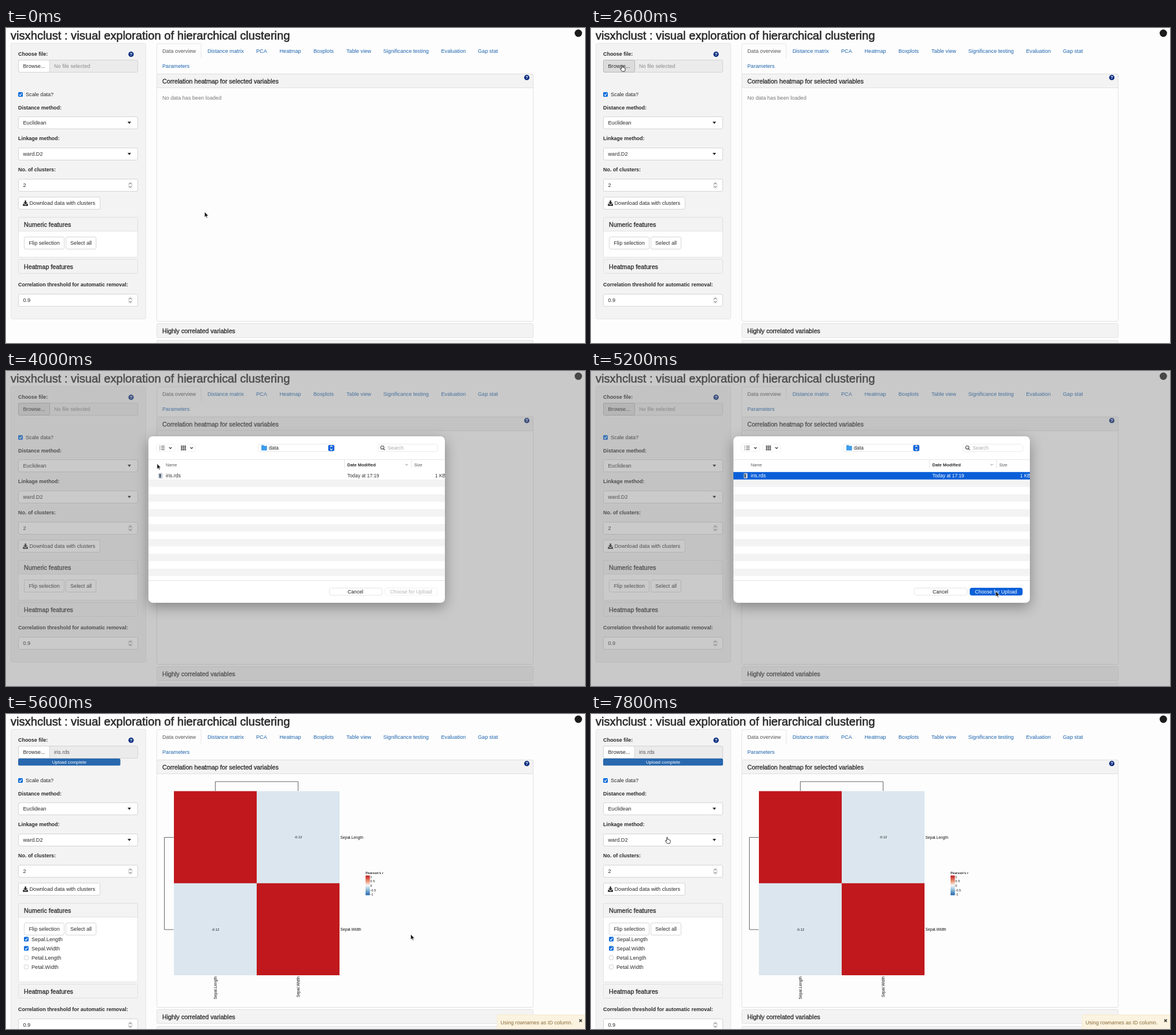
An HTML page that plays this animation: 1000x545 px, repeating every 8 s.

```html
<!DOCTYPE html>
<html lang="en">
<head>
<meta charset="utf-8">
<title>Hierarchical clustering app</title>
<style>
  html, body { margin: 0; width: 100%; height: 100%; overflow: hidden; background: #fdfdfd; }
  svg { display: block; width: 100%; height: 100%; font-family: "Liberation Sans", Arial, sans-serif; }
  text { white-space: pre; }
  #dialog { filter: drop-shadow(0 7px 11px rgba(0, 0, 0, .34)); }
</style>
</head>
<body>
<svg id="stage" viewBox="0 0 1000 545"></svg>
<script>
const LOOP = 8000, STEP = 200;
const INK = '#2b2b2b', LINK = '#1d64ae', BLUE = '#0a5fd8', RED = '#c0181c', PALE = '#dbe6ee';

// ---- drawing helpers ----
const attrs = o => Object.entries(o).map(([k, v]) => `${k}="${v}"`).join(' ');
const rect = (x, y, w, h, fill, o = {}) =>
  `<rect x="${x}" y="${y}" width="${w}" height="${h}" fill="${fill}" ${attrs(o)}/>`;
const box = (x, y, w, h, fill = '#fff', stroke = '#ccc', rx = 2.5, o = {}) =>
  rect(x + .5, y + .5, w - 1, h - 1, fill, { stroke, rx, 'stroke-width': .8, ...o });
const line = (d, stroke = '#ddd', width = .8, o = {}) =>
  `<path d="${d}" fill="none" stroke="${stroke}" stroke-width="${width}" ${attrs(o)}/>`;
const shape = (d, fill) => `<path d="${d}" fill="${fill}"/>`;
const group = (id, body, o = {}) => `<g id="${id}" ${attrs(o)}>${body}</g>`;

// y is the vertical middle of the capitals
const text = (x, y, s, size = 9.15, fill = INK, o = {}) =>
  `<text x="${x}" y="${(y + size * .35).toFixed(2)}" font-size="${size}" fill="${fill}" ${attrs(o)}>${s}</text>`;
const bold = (x, y, s, size = 8.95) => text(x, y, s, size, INK, { 'font-weight': 700 });
const medium = (x, y, s, size = 10.7) =>
  text(x, y, s, size, INK, { stroke: INK, 'stroke-width': size * .03 });

const help = (x, y) => `<circle cx="${x}" cy="${y}" r="4.6" fill="#0c2f80"/>` +
  text(x, y, '?', 7.5, '#fff', { 'text-anchor': 'middle', 'font-weight': 700 });
const button = (x, y, w, label, tx) => box(x, y, w, 22) + text(tx, y + 11, label);
const checkbox = (x, y, on) => on
  ? rect(x, y - 4, 8, 8, '#0b6cdc', { rx: 1.6 }) + line(`M${x + 1.9} ${y + .2}l1.6 1.8 2.7-4`, '#fff', 1.2)
  : box(x, y - 4, 8, 8, '#fff', '#c4c4c4', 1.6);
const select = (y, label) => box(21, y, 207, 22) + text(29.5, y + 11, label) +
  shape(`M210 ${y + 9}h6l-3 4z`, INK);
const number = (y, value) => box(21, y, 207, 22) + text(29.5, y + 11, value) +
  box(211, y + 5, 7.5, 12, '#f8f8f8', '#ddd', 2) +
  line(`M212.6 ${y + 9.4}l2.1-2.3 2.1 2.3M212.6 ${y + 12.6}l2.1 2.3 2.1-2.3`, '#444', 1);
const panelHead = (x, y, w, label) => box(x, y, w, 25, '#f3f3f3', '#dcdcdc', 2) + medium(x + 10, y + 12.8, label);

// ---- page parts ----
const tabs = [[348, 'Distance matrix'], [432, 'PCA'], [472.5, 'Heatmap'], [531, 'Boxplots'],
  [588, 'Table view'], [651.5, 'Significance testing'], [751.5, 'Evaluation'], [815, 'Gap stat']];

const header = medium(8, 12.6, 'visxhclust : visual exploration of hierarchical clustering', 20.15) +
  '<circle cx="988.5" cy="9" r="6.4" fill="#1b1b1b"/>';

const fileInput = bold(21, 45.3, 'Choose file:') + help(216, 45.4) +
  box(21, 55, 207, 22, '#ebebeb') +
  box(21, 55, 55, 22, '#fff', '#ccc', 2.5, { id: 'browse' }) + text(29.5, 66, 'Browse...') +
  text(83, 66, '', 9.15, '#8a8a8a', { id: 'fileName' }) +
  group('progress', rect(21, 77, 0, 12.3, '#2868ae', { id: 'bar', rx: 2 }) +
    text(0, 83.3, 'Upload complete', 7.9, '#fff', { id: 'barLabel', 'text-anchor': 'middle' }));

const downloadIcon = shape('M32.3 298.5h2.6v3.2h2.5l-3.8 3.7-3.8-3.7h2.5z', INK) +
  shape('M29.2 304.2h1.8l2.6 2.4 2.6-2.4h1.8v3.6h-8.8z', INK);

const features = ['Sepal.Length', 'Sepal.Width', 'Petal.Length', 'Petal.Width']
  .map((name, i) => checkbox(31, 389.6 + 16 * i, i < 2) + text(44, 389.7 + 16 * i, name)).join('');

const sidebar =
  box(8, 26, 234, 478, '#f3f3f3', '#e1e1e1', 2.5, { id: 'well' }) + fileInput +
  checkbox(21, 115, true) + text(34, 115, 'Scale data?') +
  bold(21, 137.6, 'Distance method:') + select(153, 'Euclidean') +
  bold(21, 191.3, 'Linkage method:') + select(207, 'ward.D2') +
  bold(21, 245, 'No. of clusters:') + number(261, '2') +
  button(21, 292, 142, 'Download data with clusters', 40.5) + downloadIcon +
  box(21, 327, 207, 70, '#fff', '#dcdcdc', 2, { id: 'numericPanel' }) + panelHead(21, 327, 207, 'Numeric features') +
  button(31, 361, 70, 'Flip selection', 39.5) + button(103, 361, 53, 'Select all', 111) +
  group('features', features) +
  group('lower', panelHead(21, 400, 207, 'Heatmap features') +
    bold(21, 443.8, 'Correlation threshold for automatic removal:') + number(460, '0.9'));

const mainPanel =
  line('M260.5 79V29.5q0-2.5 2.5-2.5H334.5q2.5 0 2.5 2.5V52.5') + text(270, 39.7, 'Data overview', 9.15, '#555') +
  tabs.map(([x, s]) => text(x, 39.7, s, 9.15, LINK)).join('') + text(270, 66, 'Parameters', 9.15, LINK) +
  box(260, 79, 651, 429, '#fdfdfd', '#dadada', 2) + panelHead(260, 79, 651, 'Correlation heatmap for selected variables') +
  help(899.5, 85.7) + panelHead(260, 511, 651, 'Highly correlated variables') +
  box(260, 540, 651, 25, '#f3f3f3', '#dcdcdc', 2) +
  text(270, 120.3, '', 9.15, '#777', { id: 'message' });

const mid = { 'text-anchor': 'middle' };
const sideways = (x, s) =>
  `<text transform="translate(${x} 454) rotate(-90)" text-anchor="end" font-size="6.7" fill="#111">${s}</text>`;
const plot =
  rect(290, 133.5, 286, 318.5, PALE) + rect(290, 133.5, 143, 159.3, RED) + rect(433, 292.8, 143, 159.2, RED) +
  line('M361.5 133V117H504.5V133M289.5 213.5H273.5V373H289.5', '#555', .9) +
  text(504.5, 213.3, '-0.12', 5.8, '#111', mid) + text(361.5, 372.8, '-0.12', 5.8, '#111', mid) +
  text(577.5, 213.3, 'Sepal.Length', 6.7, '#111') + text(577.5, 372.8, 'Sepal.Width', 6.7, '#111') +
  sideways(364, 'Sepal.Length') + sideways(507, 'Sepal.Width') +
  bold(621, 274.8, "Pearson's r", 5.7) + rect(621, 279.5, 7.5, 34, 'url(#scale)') +
  ['1', '0.5', '0', '-0.5', '-1'].map((s, i) => text(629.3, 281.6 + 7.7 * i, s, 5.5, '#111')).join('');

const notice = box(848, 520, 153, 27, '#fbf3df', '#f6e8c8', 2) +
  text(854, 533.6, 'Using rownames as ID column.', 9, '#8a6d3b') +
  line('M990.2 528.4l4.4 4.4m0-4.4l-4.4 4.4', '#333', 1.5);

// ---- file dialog ----
const chevron = (x, y, color = '#333', w = 1.2) => line(`M${x - 2.2} ${y - 1}l2.2 2.2 2.2-2.2`, color, w);
const stepper = color => line('M559.7 131.6l2.1-2.2 2.1 2.2M559.7 134.4l2.1 2.2 2.1-2.2', color, 1.2);
const stripes = Array.from({ length: 7 }, (_, i) => rect(246, 187.7 + 25.7 * i, 512, 12.85, '#f3f3f4')).join('');
const gridIcon = [0, 1, 2].map(r => [0, 1, 2].map(c => rect(302 + 3.2 * c, 129 + 3 * r, 2.5, 2.3, '#555')).join('')).join('');

const dialog =
  rect(246, 113, 512, 288, '#fff', { rx: 7 }) +
  box(259, 126, 33, 14, '#fff', '#ececec', 3) + box(296, 126, 32, 14, '#fff', '#ececec', 3) +
  line('M265 130h1.5m1.5 0h6M265 133h1.5m1.5 0h6M265 136h1.5m1.5 0h6', '#444', 1.1) +
  gridIcon + chevron(284, 133) + chevron(320.5, 133) +
  box(435, 126, 134, 14, '#fff', '#e2e2e2', 3) +
  shape('M441 129.2q0-1 1-1h3l1 1.2h3.8q1 0 1 1v6q0 1-1 1H442q-1 0-1-1z', '#3f9cec') + text(454, 132.8, 'data', 8.7) +
  group('stepOff', stepper('#333')) +
  group('stepOn', rect(556.5, 128, 10.5, 10.5, BLUE, { rx: 2.2 }) + stepper('#fff')) +
  box(642, 126, 104, 14, '#fff', '#e6e6e6', 3) +
  '<circle cx="650" cy="132.3" r="2.8" fill="none" stroke="#444" stroke-width="1.1"/>' +
  line('M652 134.4l2.4 2.5', '#444', 1.2) + text(659, 133, 'Search', 8.7, '#aaa') +
  line('M246 153.3H758M246 362.5H758') + line('M584.5 154V168M700.5 154V168') +
  text(276, 162, 'Name', 7.2, '#555') + bold(589.5, 162, 'Date Modified', 7.47) +
  chevron(692, 162, '#777', .9) + text(705, 162, 'Size', 7.2, '#555') +
  stripes + rect(246, 174.8, 512, 12.9, BLUE, { id: 'selection' }) +
  box(263.5, 176.5, 7, 9.5, '#eef1f4', '#aab', 1) + rect(264.5, 178, 3.5, 6.5, '#566a7c') +
  group('fileRow', text(276, 181.3, 'iris.rds', 8.8, 'inherit') +
    text(589.5, 181.3, 'Today at 17:19', 8.4, 'inherit') + text(741, 181.3, '1 KB', 8.3, 'inherit')) +
  box(558, 375, 92, 13.5, '#fff', '#dedede', 3) + text(603.5, 381.5, 'Cancel', 8.7, '#222', mid) +
  box(654, 375, 91.5, 13.5, '#fff', '#eee', 3, { id: 'choose' }) +
  text(699.5, 381.5, 'Choose for Upload', 8.75, '#222', { id: 'chooseLabel', ...mid });

const arrow = '<path d="M0 0V9.6L2.2 7.6 3.7 11 5.2 10.4 3.7 7.1H6.6Z" fill="#111" stroke="#fff" stroke-width=".7"/>';
const hand = '<path d="M2.6 6V1.2q0-1 .9-1t.9 1V4.2q1-.6 1.6.2 1-.4 1.5.4 1.5-.2 1.5 1.2V8q0 1.4-1 3H3.6Q2.4 9.2.5 7q-.4-1 .4-1.2.8 0 1.7 1z" fill="#fff" stroke="#222" stroke-width=".9" stroke-linejoin="round"/>';

const stage = document.getElementById('stage');
stage.innerHTML =
  `<defs><linearGradient id="scale" x2="0" y2="1"><stop stop-color="${RED}"/>
   <stop offset=".3" stop-color="#ec9b7c"/><stop offset=".5" stop-color="#f7f7f7"/>
   <stop offset=".7" stop-color="#9ac4dd"/><stop offset="1" stop-color="#2166ac"/></linearGradient>
   <clipPath id="sheet"><rect x="246" y="113" width="512" height="288" rx="7"/></clipPath></defs>` +
  rect(0, 0, 1000, 545, '#fdfdfd') + header + sidebar + mainPanel +
  group('plot', plot) + group('notice', notice) +
  rect(0, 0, 1000, 545, '#808080', { id: 'dim' }) +
  group('dialog', `<g clip-path="url(#sheet)">${dialog}</g>`) +
  group('cursor', group('arrow', arrow) + group('hand', hand));

// ---- animation ----
const el = id => document.getElementById(id);
const set = (id, o) => { for (const k in o) el(id).setAttribute(k, o[k]); };
const show = (id, on) => set(id, { display: on ? 'inline' : 'none' });

// time, x, y of the pointer
const path = [[0, 343, 318], [400, 190, 90], [600, 64, 12], [1200, 428, 44], [1600, 300, 88],
  [2000, 110, 70], [2400, 50, 64], [3400, 50, 64], [4200, 300, 178], [4600, 300, 178],
  [5200, 699, 381], [6600, 699, 381], [7400, 142, 189], [7600, 142, 189], [7800, 128, 213], [8000, 128, 213]];

function pointer(t) {
  const i = path.findIndex(k => k[0] > t);
  const [t0, x0, y0] = path[i - 1], [t1, x1, y1] = path[i];
  const u = (t - t0) / (t1 - t0), s = u * u * (3 - 2 * u);
  return [x0 + (x1 - x0) * s, y0 + (y1 - y0) * s];
}

function render(now) {
  const t = Math.floor(now % LOOP / STEP) * STEP;
  const loaded = t >= 5400, closing = t === 5400, open = t >= 3000 && t <= 5400;
  const focused = t > 3000 && !closing, picked = t >= 4400;

  const pressed = t >= 2600 && t <= 5400, hover = t >= 2200 && t < 2600;
  set('browse', { fill: pressed ? '#dcdcdc' : hover ? '#e8e8e8' : '#fff', stroke: pressed || hover ? '#adadad' : '#ccc' });
  el('fileName').textContent = loaded ? 'iris.rds' : 'No file selected';
  set('fileName', { fill: loaded ? '#555' : '#8a8a8a' });
  const width = closing ? 81 : t === 5600 ? 176.5 : 207;
  show('progress', loaded);
  set('bar', { width });
  set('barLabel', { x: 21 + width / 2 });

  const grow = loaded ? 67 : 0;
  set('well', { height: 477 + grow });
  set('numericPanel', { height: 69 + grow });
  set('lower', { transform: `translate(0 ${grow})` });
  show('features', loaded);

  el('message').textContent = !loaded ? 'No data has been loaded' : closing ? 'No features have been selected' : '';
  show('plot', t >= 5600);
  show('notice', loaded);
  set('notice', { opacity: closing ? .55 : 1 });

  show('dim', open);
  set('dim', { opacity: closing ? .19 : t === 3000 ? .38 : .42 });
  show('dialog', open);
  set('dialog', { opacity: closing ? .68 : 1, transform: `translate(0 ${closing ? -12 : t === 3000 ? -1.7 : 0})` });
  show('stepOn', focused);
  show('stepOff', !focused);
  show('selection', picked);
  set('fileRow', { fill: picked ? '#fff' : '#333' });
  const ready = picked && !closing;
  set('choose', { fill: ready ? BLUE : '#fff', stroke: ready ? BLUE : '#eee' });
  set('chooseLabel', { fill: ready ? '#fff' : closing ? '#222' : '#b4b4b4' });

  const [x, y] = pointer(t), pointing = t >= 2200 && t <= 3400 || t >= 7800;
  set('cursor', { transform: `translate(${x.toFixed(1)} ${y.toFixed(1)})` });
  show('hand', pointing);
  show('arrow', !pointing);
}

const start = performance.now();
function tick() {
  render(performance.now() - start);
  requestAnimationFrame(tick);
}
tick();
</script>
</body>
</html>
```
